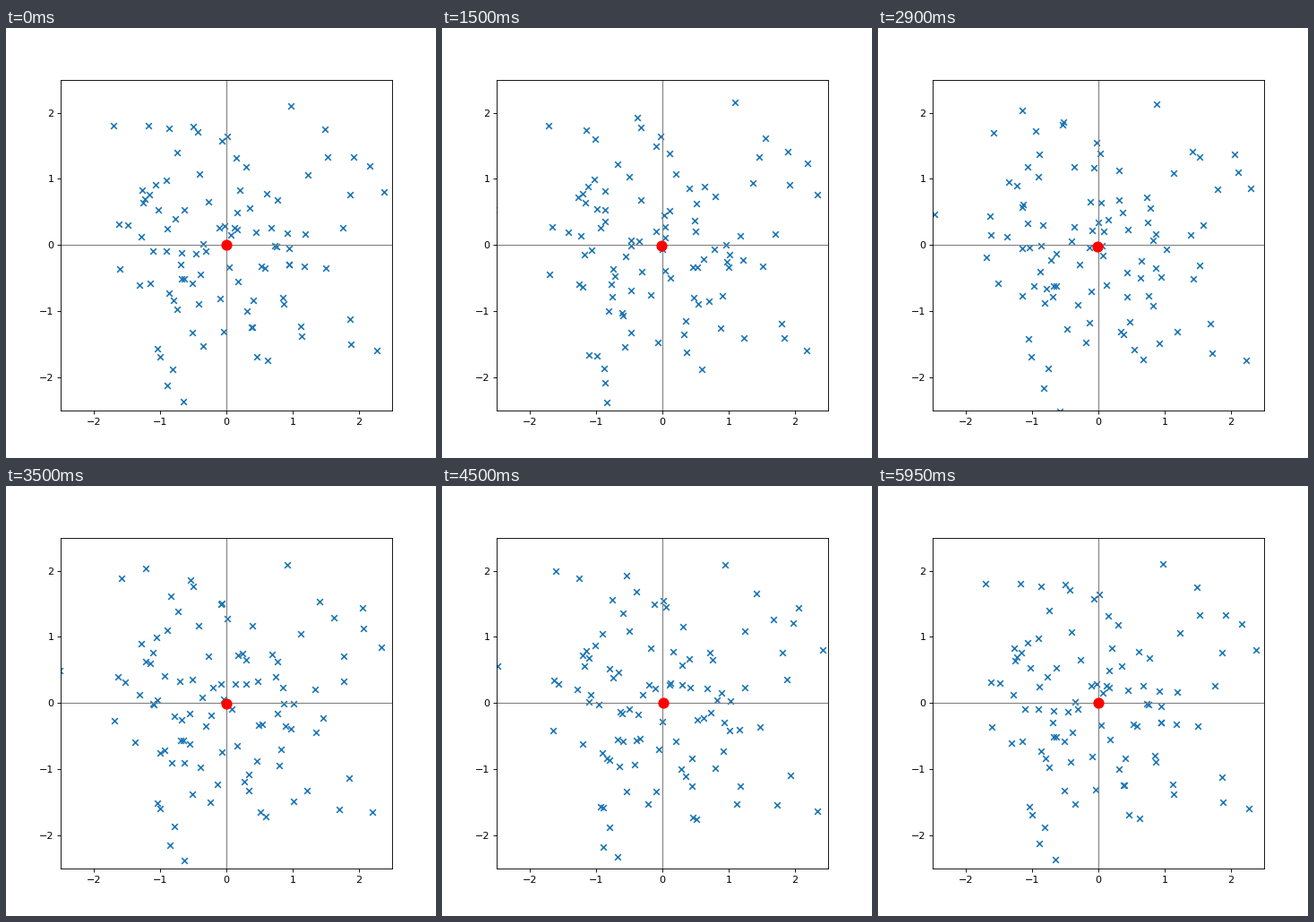
A matplotlib script that plays this animation: 480 by 480 pixels, repeating every 6000 ms.

```python
import numpy as np
import matplotlib.pyplot as plt
from matplotlib.animation import FuncAnimation

COUNT = 100
POSES = 6
STEPS = 20          # frames per move, both end poses included
NOISE = 0.12

np.random.seed(0)
base = np.random.randn(COUNT, 2)
base -= base.mean(axis=0)
poses = [base]
poses += [base + NOISE * np.random.randn(COUNT, 2) for _ in range(POSES - 1)]


def points_at(frame):
    """Linear move from one jittered pose to the next."""
    move, step = divmod(frame, STEPS)
    t = step / (STEPS - 1)
    start, end = poses[move], poses[(move + 1) % POSES]
    return (1 - t) * start + t * end


fig, ax = plt.subplots(figsize=(6, 6), dpi=80)
ax.set_aspect("equal")
ax.set_xlim(-2.5, 2.5)
ax.set_ylim(-2.5, 2.5)
ax.axhline(0, color="gray", lw=1)
ax.axvline(0, color="gray", lw=1)
cloud = ax.scatter(*base.T, marker="x", color="C0", s=36)
center, = ax.plot([0], [0], "o", color="red", markersize=10, zorder=3)


def update(frame):
    points = points_at(frame)
    cloud.set_offsets(points)
    x, y = points.mean(axis=0)
    center.set_data([x], [y])
    return cloud, center


anim = FuncAnimation(fig, update, frames=POSES * STEPS, interval=50,
                     repeat=True, repeat_delay=0)
plt.show()
```
